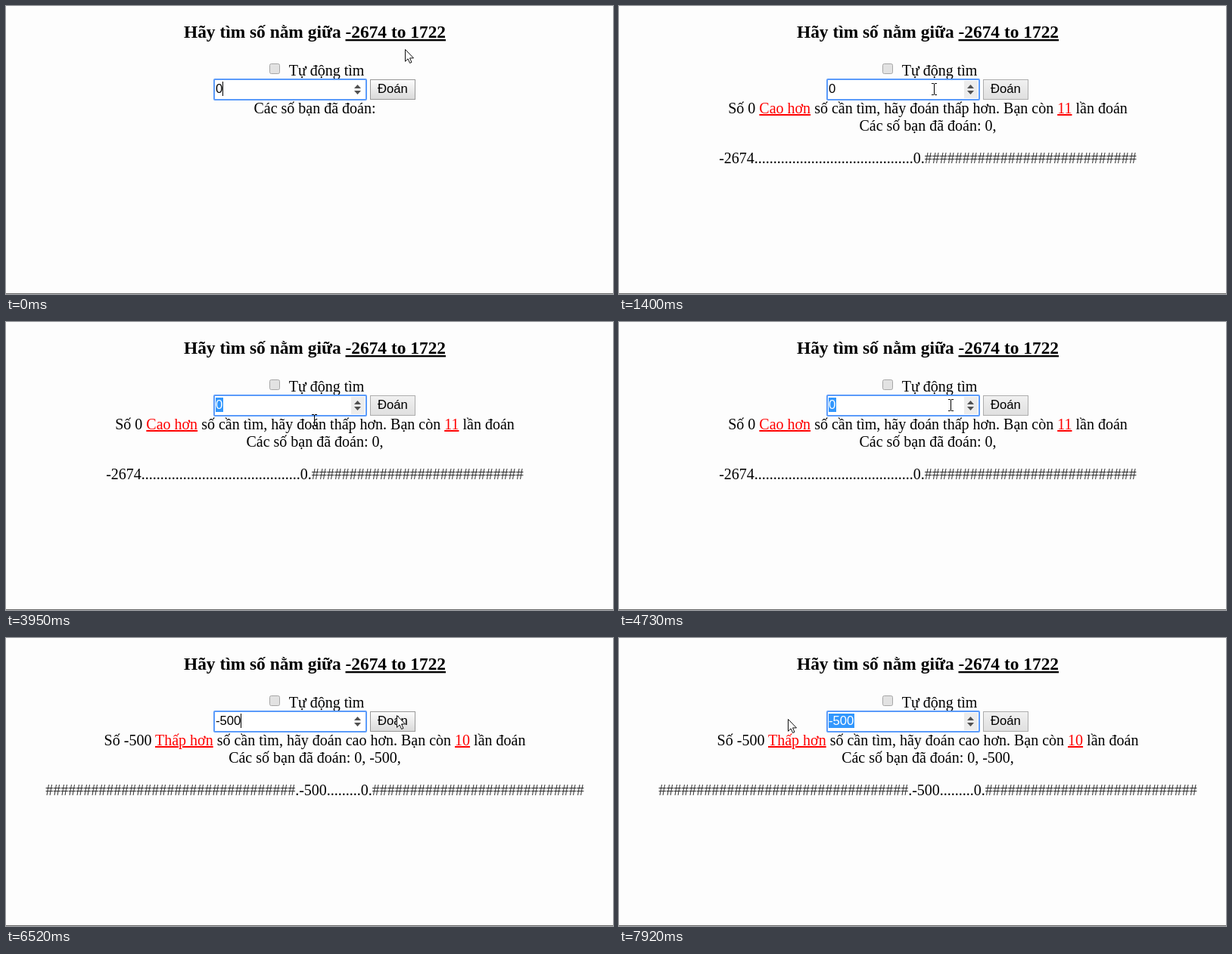
Write an HTML page that moves like this. It is 802 px wide and 381 px high and loops after 8 s.

```html
<!DOCTYPE html>
<html lang="vi">
<head>
<meta charset="utf-8">
<title>Đoán số</title>
<style>
html, body { margin: 0; width: 100%; height: 100%; overflow: hidden; background: #fdfdfd; }
svg { display: block; }
text { white-space: pre; text-decoration-skip-ink: none; }
.serif { font: 20px "Liberation Serif", "Times New Roman", serif; text-anchor: middle; }
.title { font-size: 23.4px; font-weight: bold; }
.left { text-anchor: start; }
.sans { font: 16.667px "Liberation Sans", Arial, sans-serif; }
.u { text-decoration: underline; text-decoration-thickness: 2px; }
.red { fill: #f00; }
.hash { fill: #333; }
</style>
</head>
<body>
<svg width="802" height="381" viewBox="0 0 802 381">
  <defs>
    <linearGradient id="normal" x2="0" y2="1"><stop stop-color="#f1f1f1"/><stop offset="1" stop-color="#dfdfdf"/></linearGradient>
    <linearGradient id="hot" x2="0" y2="1"><stop stop-color="#fcfcfc"/><stop offset=".35" stop-color="#f0f0f0"/><stop offset="1" stop-color="#d9d9d9"/></linearGradient>
    <linearGradient id="pressed" x2="0" y2="1"><stop stop-color="#dcdcdc"/><stop offset="1" stop-color="#ededed"/></linearGradient>
  </defs>
  <rect y="380" width="802" height="1" fill="#666"/>
  <text class="serif title" x="408" y="42">Hãy tìm số nằm giữa <tspan class="u">-2674 to 1722</tspan></text>

  <rect x="348.5" y="76.5" width="13" height="13" rx="2" fill="#e2e2e2" stroke="#a6a6a6"/>
  <text class="serif left" x="373.7" y="92">Tự động tìm</text>

  <rect id="box" fill="#fff"/>
  <g id="spin">
    <rect id="spinBg" x="456" y="99" width="18" height="23" fill="#ececec"/>
    <path d="M460 109l4.5-5 4.5 5zM460 112l4.5 5 4.5-5z" fill="#505050"/>
  </g>
  <rect id="sel" x="277" y="100" height="19" fill="#3297fd"/>
  <text id="value" class="sans" x="277" y="115"></text>
  <rect id="caret" y="100" width="1" height="19"/>

  <rect id="button" x="481.5" y="97.5" width="59" height="26"/>
  <text class="sans" x="491" y="115">Đoán</text>

  <text id="hint" class="serif" x="408" y="142"></text>
  <text id="list" class="serif" x="408"></text>
  <text id="range" class="serif" x="408" y="208"></text>

  <path id="arrow" d="M.5.5V16.3L4.1 12.9 6.6 18.5 9 17.4 6.5 11.9H11.5z" fill="#fff" stroke="#111"/>
  <path id="beam" d="M-3-7.5H0M1-7.5H4M.5-7V7M-3 7.5H0M1 7.5H4" fill="none" stroke="#000"/>
</svg>
<script>
// The screen is refreshed in ticks; all times below are tick counts.
const LOOP = 8000, TICK = 127.75, LEAD = 22;
const $ = id => document.getElementById(id);
const set = (el, attrs) => { for (const k in attrs) el.setAttribute(k, attrs[k]); };
const show = (id, on) => { $(id).style.display = on ? "" : "none"; };

// Straight pointer moves; the pointer rests between them.
const home = { x: 527, y: 57 };
const moves = [
  { from: 0, to: 4, x: 512, y: 105 },    // to the button
  { from: 7, to: 11, x: 416, y: 110 },   // into the field
  { from: 11, to: 14, x: 378, y: 112 },
  { from: 14, to: 15, x: 252, y: 113 },  // drag left to select
  { from: 20, to: 24, x: 409, y: 128 },
  { from: 30, to: 33, x: 404, y: 135 },
  { from: 33, to: 37, x: 438, y: 110 },
  { from: 41, to: 43, x: 438, y: 98 },
  { from: 44, to: 45, x: 453, y: 98 },
  { from: 45, to: 47, x: 516, y: 102 },  // back to the button
  { from: 54, to: 62, x: 223, y: 107 }   // drag left again
];

const hash = n => `<tspan class="hash">${"#".repeat(n)}</tspan>`;
const dots = n => ".".repeat(n);
const red = s => `<tspan class="u red">${s}</tspan>`;
const hint = (n, verdict, advice, left) =>
  `Số ${n} ${red(verdict)} số cần tìm, hãy đoán ${advice}. Bạn còn ${red(left)} lần đoán`;

const blank = { hint: "", list: "", range: "" };
const first = {
  hint: hint(0, "Cao hơn", "thấp hơn", 11),
  list: " 0,",
  range: `-2674${dots(42)}0.${hash(28)}`
};
const second = {
  hint: hint(-500, "Thấp hơn", "cao hơn", 10),
  list: " 0, -500,",
  range: `${hash(33)}.-500${dots(9)}0.${hash(28)}`
};

// Each input restarts the caret's blinking.
const inputs = [
  { at: -2, value: "0", result: blank },
  { at: 6, value: "0", result: first },
  { at: 40, value: "-", result: first },
  { at: 42, value: "-5", result: first },
  { at: 45, value: "-50", result: first },
  { at: 46, value: "-500", result: first },
  { at: 51, value: "-500", result: second }
];

const textWidth = s => [...s].reduce((w, c) => w + (c === "-" ? 0.333 : 0.556), 0) * 16.667;

function pointerAt(tick) {
  let { x, y } = home;
  for (const m of moves) {
    const p = Math.min(1, Math.max(0, (tick - m.from) / (m.to - m.from)));
    x += (m.x - x) * p;
    y += (m.y - y) * p;
  }
  return [Math.round(x), Math.round(y)];
}

let shown;
function drawResult(r) {
  if (r === shown) return;
  shown = r;
  $("hint").innerHTML = r.hint;
  $("list").textContent = "Các số bạn đã đoán:" + r.list;
  $("list").setAttribute("y", r.hint ? 165 : 142);
  $("range").innerHTML = r.range;
}

function draw(t) {
  const tick = Math.floor((t + LEAD) / TICK);
  const [x, y] = pointerAt(tick);
  const { at, value, result } = inputs.findLast(i => i.at <= tick);
  const width = textWidth(value);
  const pressed = tick === 5;
  const hot = x > 480;
  const marked = tick >= 15 && tick < 40 || tick >= 60;
  const overField = x > 277 && x < 477 && y > 90;

  set($("box"), pressed
    ? { x: 275.5, y: 97.5, width: 200, height: 26, rx: 0, stroke: "#a9a9a9", "stroke-width": 1 }
    : { x: 275, y: 97, width: 201, height: 27, rx: 1, stroke: "#5b9bfa", "stroke-width": 2 });
  show("spin", !pressed);
  show("spinBg", !hot);

  show("sel", marked);
  set($("sel"), { width: Math.ceil(width) });
  $("value").textContent = value;
  set($("value"), { fill: marked ? "#fff" : "#000" });
  show("caret", !pressed && !marked && (tick - at) % 8 < 4);
  set($("caret"), { x: Math.floor(277 + width) });

  const look = pressed ? "pressed" : hot ? "hot" : "normal";
  set($("button"), { fill: `url(#${look})`, stroke: look === "normal" ? "#adadad" : "#999" });

  drawResult(result);

  show("arrow", !overField);
  show("beam", overField);
  set($(overField ? "beam" : "arrow"), { transform: `translate(${x} ${y})` });
}

const start = performance.now();
function frame() {
  draw((performance.now() - start) % LOOP);
  requestAnimationFrame(frame);
}
frame();
</script>
</body>
</html>
```
